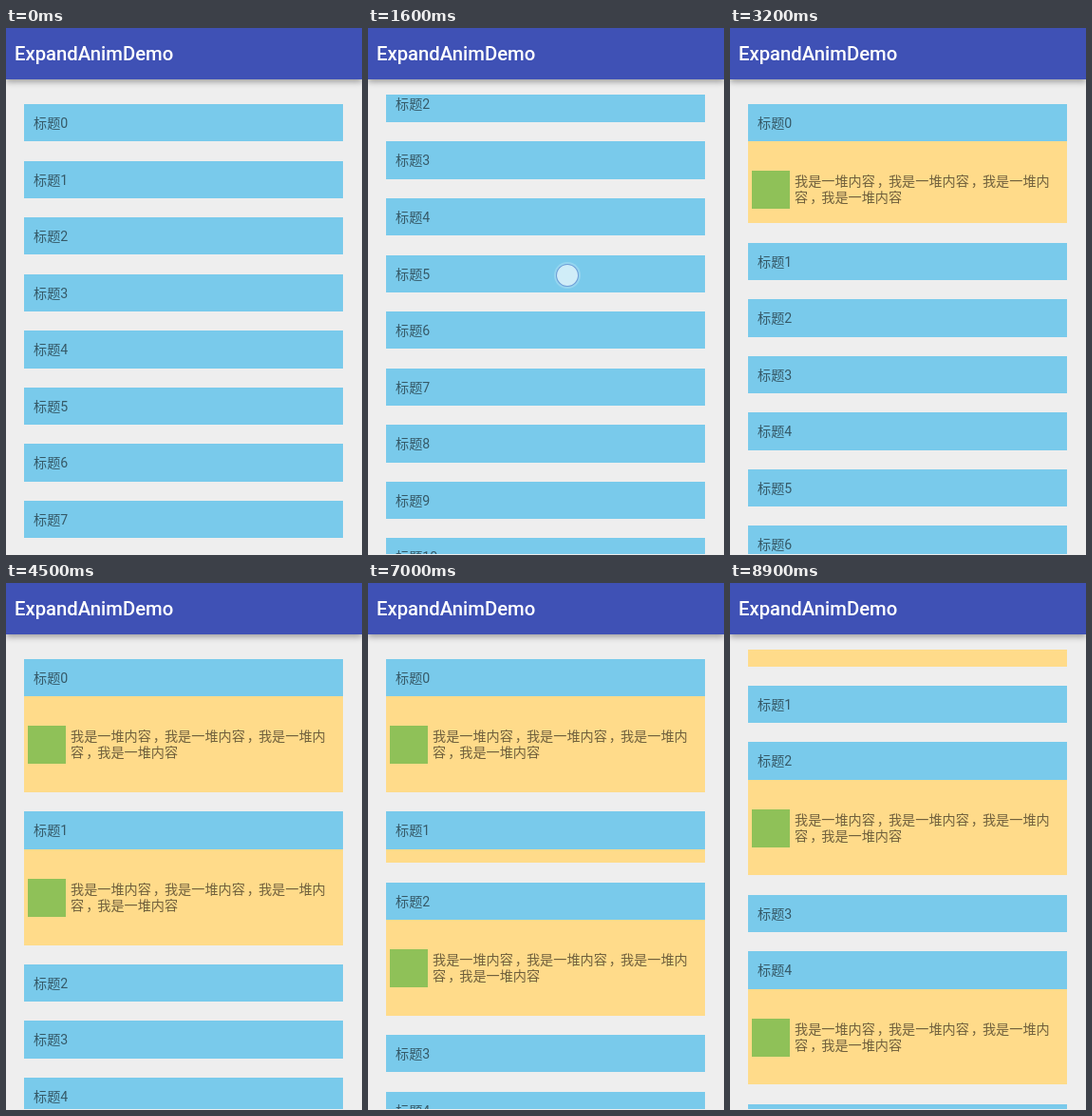
Animation, 375 px wide and 554 px high, one loop 10000 ms. Source, as an HTML page:

```html
<!DOCTYPE html>
<html lang="zh-CN">
<head>
<meta charset="utf-8">
<style>
html, body { margin: 0; width: 100%; height: 100%; overflow: hidden; background: #eee; }
body { position: relative; font: 14.15px Roboto, "Noto Sans CJK SC", "Noto Sans CJK", sans-serif; color: rgba(0,0,0,.56); white-space: nowrap; }
header { position: absolute; inset: 0 0 auto; height: 54px; box-sizing: border-box; padding-left: 9px; font-size: 20.3px; font-weight: 500; line-height: 54px; color: #fff; background: #3f51b5; box-shadow: 0 3px 6px rgba(0,0,0,.32); }
main { position: absolute; inset: 70px 0 1px; overflow: hidden; }
#list { position: absolute; left: 19px; right: 20px; }
section { margin-bottom: 20.17px; }
h2 { margin: 0; height: 39.4px; padding-left: 10px; font: inherit; line-height: 40px; background: #79caeb; }
.content { position: relative; overflow: hidden; height: 0; background: #ffdb8a; }
.icon { position: absolute; left: 4px; top: 31px; width: 40px; height: 40px; background: #8fc158; }
p { position: absolute; left: 49px; top: 34px; margin: 0; line-height: 17px; }
i { position: relative; left: 2px; font-style: normal; }
#touch { position: absolute; left: -12px; top: -12px; width: 24px; height: 24px; box-sizing: border-box; border: 1.5px solid rgba(105,105,190,.45); border-radius: 50%; background: rgba(255,255,255,.65); background-clip: padding-box; box-shadow: 0 0 0 2px rgba(255,255,255,.2); }
</style>
</head>
<body>
<main><div id="list"></div></main>
<header>ExpandAnimDemo</header>
<div id="touch"></div>
<script>
const LOOP = 10000, STEP = 100, ROWS = 12;
const LIST_TOP = 10, CONTENT_HEIGHT = 100.8, EXPAND_TIME = 400;
const list = document.getElementById('list');
const touch = document.getElementById('touch');
const text = '我是一堆内容，我是一堆内容，我是一堆内<br>容，我是一堆内容'.replace(/，/g, '<i>，</i>');

for (let n = 0; n < ROWS; n++) {
  list.insertAdjacentHTML('beforeend',
    `<section><h2>标题${n}</h2><div class="content"><div class="icon"></div><p>${text}</p></div></section>`);
}
const contents = [...document.querySelectorAll('.content')];

// Swipes scroll the list between two offsets; y is where the finger lands
const swipes = [
  { start: 900, duration: 600, from: 0, to: 139.2, x: 202, y: 364.6 },
  { start: 1600, duration: 414, from: 139.2, to: 0, x: 210, y: 260 },
  { start: 7450, duration: 591, from: 0, to: 132.6, x: 201, y: 396.5 }
];
// Each tap toggles its row when released
const taps = [
  { release: 2900, row: 0, x: 136, y: 94 },
  { release: 4100, row: 1, x: 134, y: 270 },
  { release: 5700, row: 2, x: 126, y: 429 },
  { release: 6700, row: 1, x: 130, y: 263 },
  { release: 8500, row: 4, x: 130, y: 417 }
];

const progress = (t, start, duration) => Math.min(1, Math.max(0, (t - start) / duration));
const ease = k => (1 - Math.cos(Math.PI * k)) / 2;

function scrollAt(t) {
  const swipe = swipes.findLast(s => t >= s.start);
  return swipe ? swipe.from + (swipe.to - swipe.from) * ease(progress(t, swipe.start, swipe.duration)) : 0;
}

function opennessAt(t, row) {
  return taps.filter(tap => tap.row === row).reduce((open, tap) => {
    const k = ease(progress(t, tap.release, EXPAND_TIME));
    return open + (1 - 2 * open) * k;
  }, 0);
}

function fingerAt(t, scroll) {
  const swipe = swipes.find(s => t >= s.start && t < s.start + s.duration * .75);
  if (swipe) return { x: swipe.x, y: swipe.y + swipe.from - scroll, alpha: 1 };
  const tap = taps.find(p => t >= p.release - 100 && t < p.release + 200);
  return tap ? { ...tap, alpha: t <= tap.release ? 1 : .4 } : { x: 0, y: 0, alpha: 0 };
}

function draw() {
  const t = Math.floor(performance.now() % LOOP / STEP) * STEP;
  const scroll = scrollAt(t);
  list.style.top = LIST_TOP - scroll + 'px';
  contents.forEach((content, row) => {
    content.style.height = opennessAt(t, row) * CONTENT_HEIGHT + 'px';
  });
  const { x, y, alpha } = fingerAt(t, scroll);
  touch.style.transform = `translate(${x}px, ${y}px)`;
  touch.style.opacity = alpha;
  requestAnimationFrame(draw);
}
draw();
</script>
</body>
</html>
```
